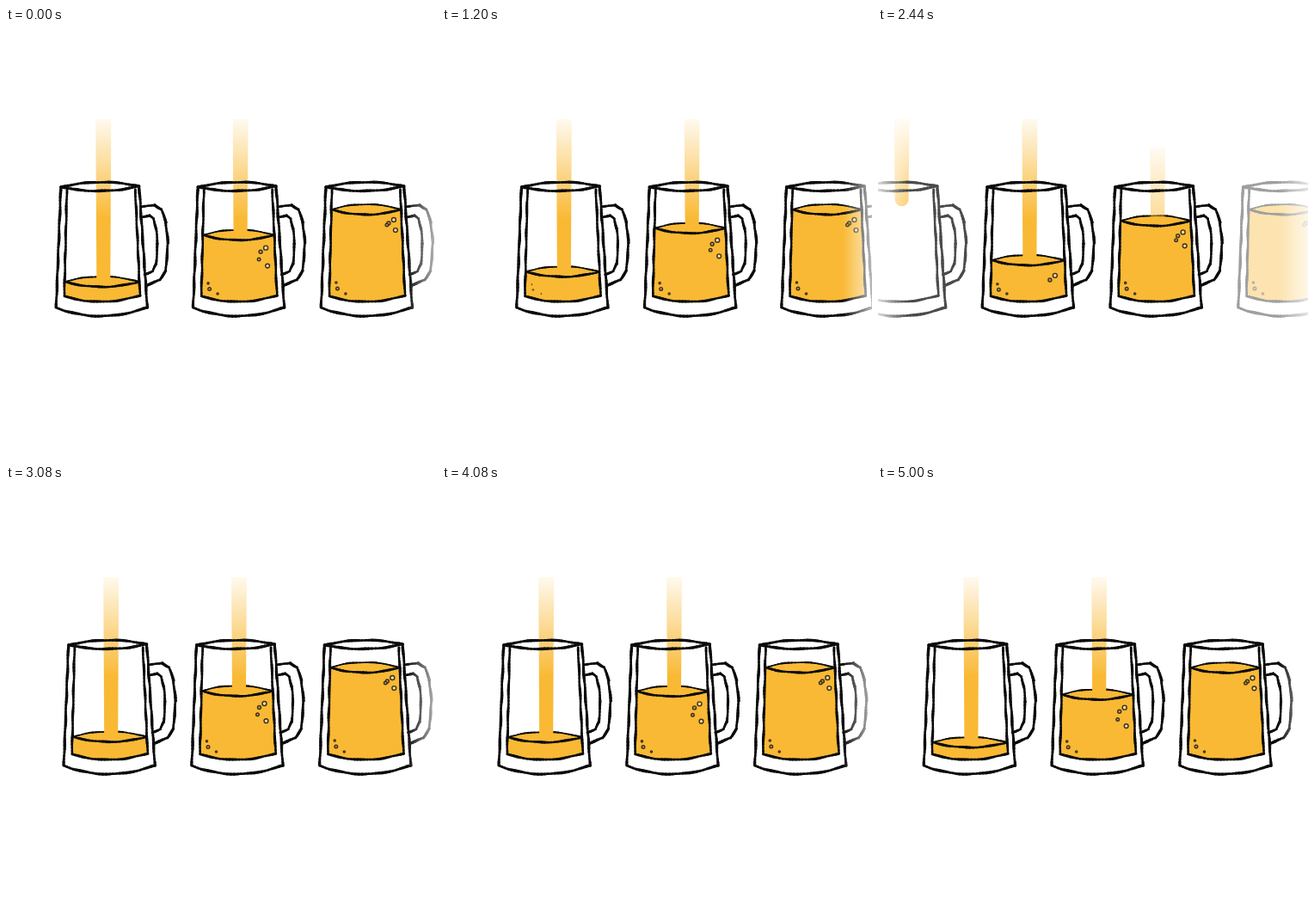
Recreate the animation shown at these times as an HTML page with a canvas. Size 500x500 px, loop 5040 ms.

```html
<!DOCTYPE html>
<html lang="en">
<head>
<meta charset="utf-8">
<title>Filling mugs</title>
<style>
  html, body { margin: 0; width: 100%; height: 100%; overflow: hidden; background: #fff; }
  canvas { display: block; width: 500px; height: 500px; }
</style>
</head>
<body>
<canvas id="stage" width="500" height="500"></canvas>
<script>
const ctx = document.getElementById('stage').getContext('2d');
const LOOP = 5040, STEP = 40, CYCLE = 1008;
const SPEED = 149, PITCH = 148.8;
const BEER = '249,185,52', FULL = 211;

const clamp = v => Math.max(0, Math.min(1, v));
const mix = (a, b, s) => a + (b - a) * s;

// All of these depend on a mug's age, counted in cycles.
const tipAt = age => 106 + 430 * (age - .185);
const levelAt = age => Math.max(318 - 95 * (age - .75),
  FULL + 29.7 * Math.max(0, 3 - age) ** 1.5);
const opacityAt = age => Math.min(clamp((age - .2) / .3), clamp((3.55 - age) / .33));
const drainAt = age => clamp((age - 2.25) / .55);

// Height is y when the mug is full; rise tells how far it follows the surface.
const BUBBLES = [
  { x: 85, y: 223, rise: 1.1, r: 2.5, born: 1.28 },
  { x: 79, y: 227, rise: 1.12, r: 2, born: 1.28 },
  { x: 77, y: 229, rise: 1.35, r: 1.8, born: 1.62 },
  { x: 87, y: 235, rise: 1.4, r: 2.4, born: 1.62 },
  { x: 18, y: 296, rise: .03, r: 1.1, born: 1.15 },
  { x: 19.5, y: 303, rise: .02, r: 1.8, born: 1.15 },
  { x: 29, y: 309, rise: 0, r: 1.1, born: 1.15 }
];

// Samples a quadratic curve; without a control point it is a line.
function curve([x1, y1], [x2, y2], [cx, cy] = [(x1 + x2) / 2, (y1 + y2) / 2]) {
  const n = Math.ceil(Math.hypot(x2 - x1, y2 - y1) / 4);
  return Array.from({ length: n + 1 }, (_, i) => {
    const s = i / n;
    return [mix(mix(x1, cx, s), mix(cx, x2, s), s), mix(mix(y1, cy, s), mix(cy, y2, s), s)];
  });
}

const polyline = pts => pts.slice(1).flatMap((p, i) => curve(pts[i], p));

// Brush stroke with a slight wobble in place and width.
function ink(points, width, seed) {
  ctx.strokeStyle = '#0b0b0b';
  ctx.lineCap = 'round';
  let last;
  points.forEach(([x, y], i) => {
    const p = [x + .25 * Math.sin(i * .8 + seed), y + .25 * Math.sin(i * .7 + seed * 2)];
    if (last) {
      ctx.lineWidth = width * (1 + .15 * Math.sin(i * .9 + seed * 3));
      ctx.beginPath();
      ctx.moveTo(...last);
      ctx.lineTo(...p);
      ctx.stroke();
    }
    last = p;
  });
}

const HANDLE = [[100, 208], [115, 206], [123, 211], [128, 226], [130.5, 250],
  [128, 282], [121, 293], [106, 299]];
const HANDLE_HOLE = HANDLE.map(([x, y]) => [100 + (x - 100) * .6, 253 + (y - 253) * .74]);

const RIM_L = [6, 185], RIM_R = [97, 184], BASE_L = [.5, 325], BASE_R = [106.5, 325];
const IN_L = [13, 188], IN_R = [92.5, 188], FLOOR_L = [10, 312], FLOOR_R = [98, 311];

const OUTER = [
  curve(RIM_L, RIM_R, [52, 174]),
  curve(RIM_L, RIM_R, [52, 194.5]),
  curve(RIM_L, BASE_L),
  curve(BASE_L, BASE_R, [50, 345]),
  curve(RIM_R, BASE_R),
  polyline(HANDLE)
];
const INNER = [
  curve(IN_L, FLOOR_L),
  curve(FLOOR_L, FLOOR_R, [54, 325]),
  curve(IN_R, FLOOR_R),
  polyline(HANDLE_HOLE)
];

function clipInside(paint) {
  ctx.save();
  ctx.beginPath();
  ctx.moveTo(...IN_L);
  ctx.lineTo(...FLOOR_L);
  ctx.quadraticCurveTo(54, 325, ...FLOOR_R);
  ctx.lineTo(...IN_R);
  ctx.clip();
  paint();
  ctx.restore();
}

function surfaceLine(level, bend, width) {
  const s = (level - 188) / 123;
  const left = mix(IN_L[0], FLOOR_L[0], s), right = mix(IN_R[0], FLOOR_R[0], s);
  const points = curve([left, level], [right, level], [(left + right) / 2, level + bend]);
  if (bend < 0) {
    ctx.fillStyle = `rgb(${BEER})`;
    ctx.beginPath();
    points.forEach(p => ctx.lineTo(...p));
    ctx.lineTo(110, 330);
    ctx.lineTo(0, 330);
    ctx.fill();
  }
  ink(points, width, bend);
}

function stream(end, drain, round) {
  const top = 106 + 106 * drain;
  if (end <= top || drain === 1) return;
  const g = ctx.createLinearGradient(0, top, 0, top + 116);
  g.addColorStop(0, `rgba(${BEER},${.08 * (1 - drain)})`);
  g.addColorStop(1, `rgba(${BEER},${1 - drain})`);
  ctx.fillStyle = g;
  ctx.beginPath();
  ctx.moveTo(46.5, top);
  ctx.lineTo(64.5, top);
  if (round) {
    const y = Math.max(top, end - 8);
    ctx.lineTo(63.5, y);
    ctx.arc(55.5, y, 8, 0, Math.PI);
  } else {
    ctx.lineTo(63.5, end);
    ctx.lineTo(47.5, end);
  }
  ctx.fill();
}

function bubble({ x, y, rise, r, born }, age, level) {
  const grow = clamp((age - born) / .08);
  if (!grow) return;
  ctx.beginPath();
  ctx.arc(x, y + rise * (level - FULL), r * grow, 0, 7);
  ctx.fillStyle = r > 2.2 ? '#fbdc98' : '#c79a4a';
  ctx.fill();
  ctx.strokeStyle = '#3a3020';
  ctx.lineWidth = 1.4 * grow;
  ctx.stroke();
}

function mug(x, age) {
  const opacity = opacityAt(age);
  if (!opacity) return;
  const filled = age > .75, level = levelAt(age);
  ctx.save();
  ctx.translate(x, 0);
  if (filled) clipInside(() => surfaceLine(level, -12, 1.9));
  stream(filled ? Math.min(level, 317) : Math.min(tipAt(age), 317), drainAt(age), !filled);
  if (filled) {
    clipInside(() => surfaceLine(level, 12, 2.7));
    BUBBLES.forEach(b => bubble(b, age, level));
  }
  OUTER.forEach((p, i) => ink(p, 3, i));
  INNER.forEach((p, i) => ink(p, 2.8, i + 7));
  // Mugs never overlap, so a white veil fades one as a whole.
  ctx.fillStyle = `rgba(255,255,255,${1 - opacity})`;
  ctx.fillRect(-5, 100, 142, 245);
  ctx.restore();
}

function edgeFade(from, to, strength) {
  const g = ctx.createLinearGradient(from, 0, to, 0);
  g.addColorStop(0, `rgba(255,255,255,${strength})`);
  g.addColorStop(1, 'rgba(255,255,255,0)');
  ctx.fillStyle = g;
  ctx.fillRect(Math.min(from, to), 0, Math.abs(to - from), 500);
}

function draw(ms) {
  const t = Math.floor(ms % LOOP / STEP) * STEP / CYCLE;
  ctx.fillStyle = '#fff';
  ctx.fillRect(0, 0, 500, 500);
  for (let n = -3; n < 5; n++) {
    const lead = n < -1 ? 10.5 : 0; // the first two mugs run ahead of the row
    mug(lead - 91 - PITCH * n + SPEED * t, t - n);
  }
  edgeFade(0, 34, .8);
  edgeFade(500, 466, .72);
}

const begin = performance.now();
function frame() {
  draw(performance.now() - begin);
  requestAnimationFrame(frame);
}
frame();
</script>
</body>
</html>
```
